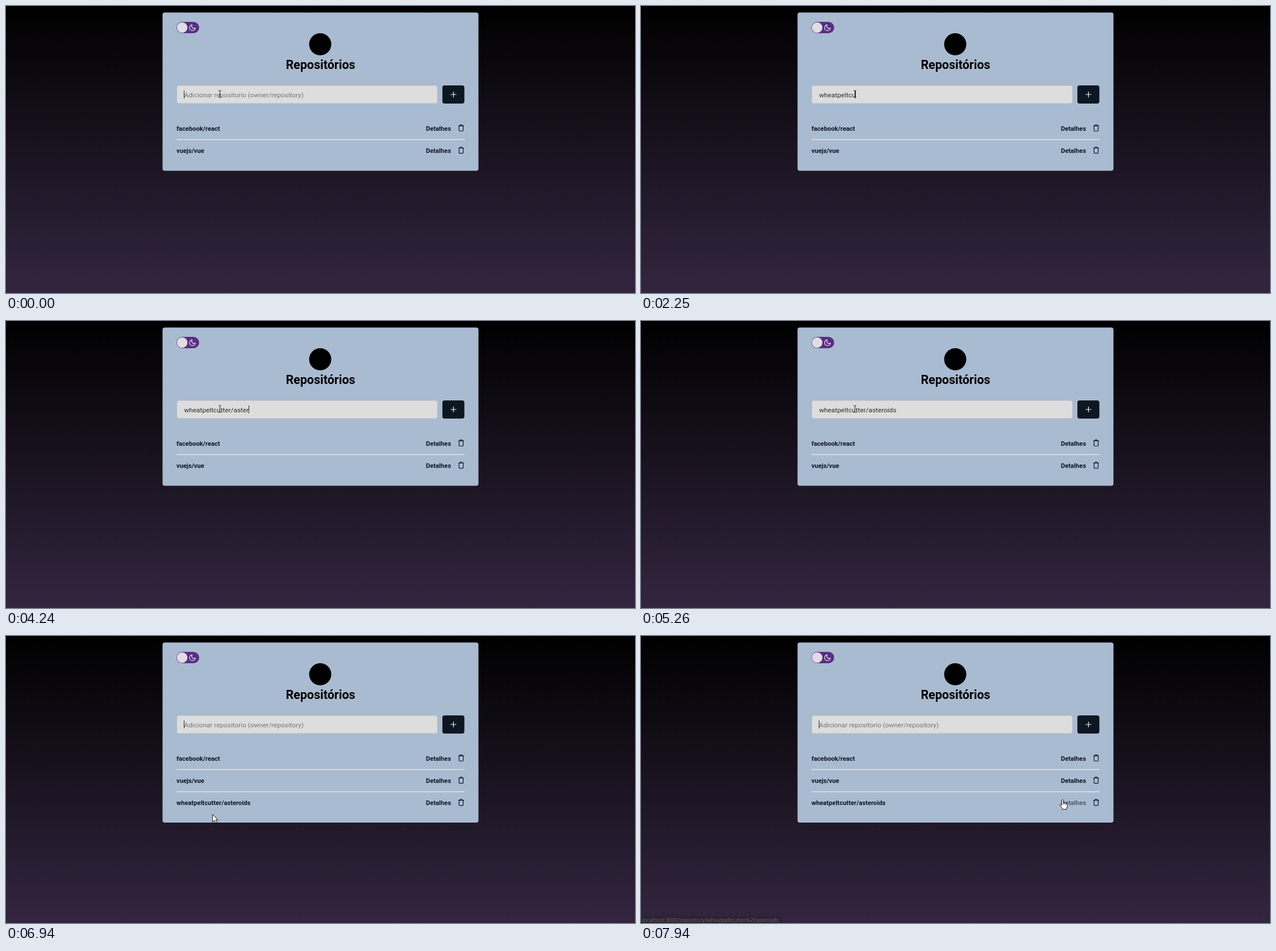
Recreate the animation shown at these times as an HTML page. Size 1107 px wide and 506 px high, loop 7990 ms.

```html
<!DOCTYPE html>
<html lang="pt">
<head>
<meta charset="utf-8">
<title>Repositórios</title>
<style>
  html, body { margin: 0; width: 100%; height: 100%; overflow: hidden; background: #000; }
  svg { display: block; width: 100%; height: 100%; font-family: Roboto, "Liberation Sans", sans-serif; }
  text { white-space: pre; }
  .title { font-size: 21.5px; font-weight: 700; text-anchor: middle; }
  .field { font-size: 11.8px; }
  .row text { font-size: 11.2px; font-weight: 700; fill: #0d1625; }
  .row path { fill: none; stroke: #0d1625; stroke-width: 1.2; stroke-linejoin: round; stroke-linecap: round; }
  .status { font-family: "Open Sans", "Noto Sans", sans-serif; font-size: 9.3px; }
</style>
</head>
<body>
<svg viewBox="0 0 1107 506">
  <defs>
    <linearGradient id="night" x2="0" y2="1">
      <stop stop-color="#000"/>
      <stop offset="1" stop-color="#33253f"/>
    </linearGradient>
  </defs>
  <rect width="1107" height="506" fill="url(#night)"/>
  <rect id="card" x="275.5" y="11.5" width="556" rx="4" fill="#a9bbd0"/>

  <rect x="300" y="28" width="40" height="20" rx="10" fill="#592d85"/>
  <circle cx="310" cy="38" r="9.3" fill="#e0dde3"/>
  <path transform="translate(321.3 31.5) scale(.57)" d="M21 12.79A9 9 0 1 1 11.21 3 7 7 0 0 0 21 12.79z"
        fill="none" stroke="#eee" stroke-width="2.1" stroke-linejoin="round"/>

  <circle cx="553" cy="67.5" r="19.5"/>
  <text class="title" x="553.5" y="111">Repositórios</text>

  <rect x="301" y="140.5" width="458" height="31" rx="3.5" fill="#ddd"/>
  <text id="entry" class="field" x="313.5" y="160.5"></text>
  <rect id="caret" y="149" width="1" height="14" fill="#222"/>
  <rect x="768" y="140" width="38.7" height="32" rx="4" fill="#0d1722"/>
  <path d="M782.5 156H792.5M787.5 151V161" stroke="#fff" stroke-width="1.1"/>

  <g id="rows"></g>

  <g id="status">
    <path d="M0 493.5H245Q248 493.5 248 496.5V506H0z" fill="#28242b"/>
    <text class="status" x="2" y="504" fill="#8e8990"></text>
  </g>

  <path id="beam" d="M-2.5 -6H-1L0 -5L1 -6H2.5M0 -5V5M-2.5 6H-1L0 5L1 6H2.5" fill="none" stroke="#222"/>
  <path id="arrow" d="M.5 .5V14L3.6 11.2L5.8 16L8 15L5.9 10.3H10z" fill="#fff" stroke="#000" stroke-width=".9"/>
  <path id="hand" d="M-1.5 1Q0 -1.4 1.5 1V5.5Q3 4.6 4 6Q5.5 5.3 6.4 6.8Q8.4 6.3 8.4 8.6V11.5Q8.2 13.5 7 15V17H-.5V15.4L-4.6 10.2Q-5.4 8.2 -3.6 8.3L-1.5 10zM1.5 5.5V8.5M4 6V8.7M6.4 6.8V9"
        fill="#fff" stroke="#000" stroke-width=".9" stroke-linejoin="round"/>
</svg>
<script>
const LOOP = 7990, SUBMIT = 5640, HOVER = 7740;
const REPO = "wheatpeltcutter/asteroids";
const PLACEHOLDER = "Adicionar repositorio (owner/repository)";
const KEY_TIMES = [410, 690, 805, 920, 1200, 1380, 1560, 1790, 1940, 2170, 2250, 2400, 2580, 2680, 2860,
  3420, 3600, 3700, 4010, 4060, 4240, 4440, 4527, 4613, 4700];
const CARET_OFF = [[3370, 3420], [5260, 5640], [6150, 6650], [7150, 7650]];
// Pointer path: time, x, y
const POINTER = [[6590, 376.5, 155], [6700, 374, 187], [6820, 367, 264], [6940, 363, 314],
  [7040, 377, 313], [7220, 461, 308], [7400, 558, 303], [7580, 674, 294], [HOVER, 742, 288.5]];

const $ = id => document.getElementById(id);
const show = (node, on) => node.setAttribute("visibility", on ? "visible" : "hidden");

function addRow(name, index) {
  const y = 220 + index * 39.2;
  const line = index ? `<rect x="300" y="${y - 24.6}" width="507" height="1.6" fill="#dfe2e6"/>` : "";
  $("rows").insertAdjacentHTML("beforeend", `<g class="row">${line}
    <text x="300" y="${y}">${name}</text>
    <text class="details" x="739" y="${y}">Detalhes</text>
    <path transform="translate(801 ${y - 5})" d="M-4.5 -3.7H4.5M-1.9 -3.9V-5.4H1.9V-3.9M-3.6 -3.5V4.3Q-3.6 5.5 -2.4 5.5H2.4Q3.6 5.5 3.6 4.3V-3.5"/>
  </g>`);
  return $("rows").lastElementChild;
}

const newRow = ["facebook/react", "vuejs/vue", REPO].map(addRow)[2];
const details = newRow.querySelector(".details");
document.querySelector(".status").textContent = "localhost:3000/repository/" + REPO.replace("/", "%2F");

function pointerAt(t) {
  const next = POINTER.findIndex(point => point[0] > t);
  if (next < 0) return POINTER.at(-1).slice(1);
  if (next === 0) return POINTER[0].slice(1);
  const [t0, x0, y0] = POINTER[next - 1], [t1, x1, y1] = POINTER[next];
  const k = (t - t0) / (t1 - t0);
  return [x0 + (x1 - x0) * k, y0 + (y1 - y0) * k];
}

function drawField(t) {
  const typed = t < SUBMIT ? REPO.slice(0, KEY_TIMES.filter(time => time <= t).length) : "";
  const entry = $("entry"), content = typed || PLACEHOLDER;
  if (entry.textContent !== content) {
    entry.textContent = content;
    entry.setAttribute("fill", typed ? "#2c2c2c" : "#757575");
  }
  const width = typed ? entry.getComputedTextLength() : 0;
  $("caret").setAttribute("x", Math.round(313 + width));
  show($("caret"), !CARET_OFF.some(([from, to]) => t >= from && t < to));
}

function drawPointer(t) {
  const [x, y] = pointerAt(t);
  const shape = t >= HOVER ? "hand" : y < 172 ? "beam" : "arrow";
  for (const id of ["beam", "arrow", "hand"]) {
    show($(id), id === shape);
    $(id).setAttribute("transform", `translate(${x} ${y})`);
  }
}

function draw(t) {
  const added = t >= SUBMIT;
  $("card").setAttribute("height", added ? 317.5 : 279);
  show(newRow, added);
  details.style.fill = t >= HOVER ? "#515d6e" : "";
  drawField(t);
  drawPointer(t);
  $("status").setAttribute("opacity", Math.min(1, Math.max(0, (t - 7840) / 160)));
}

const start = performance.now();
function frame() {
  draw((performance.now() - start) % LOOP);
  requestAnimationFrame(frame);
}
frame();
</script>
</body>
</html>
```
